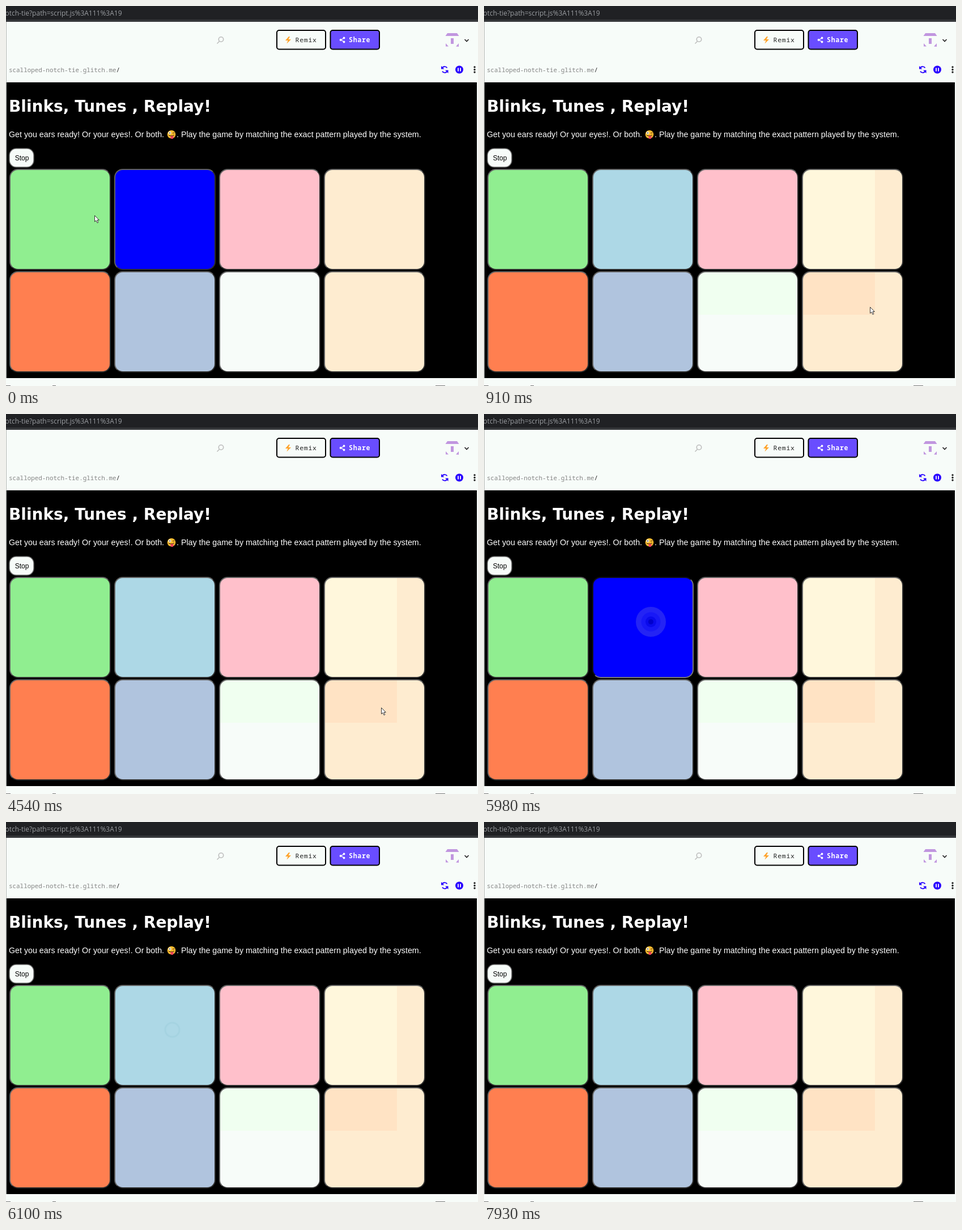
Recreate the animation shown at these times as an HTML page. Size 833x672 px, loop 8 s.

```html
<!DOCTYPE html>
<html lang="en">
<head>
<meta charset="utf-8">
<style>
html, body { margin: 0; width: 100%; height: 100%; overflow: hidden; background: #f7fcf9; }
svg { position: absolute; left: 0; top: 0; }
.tile {
  position: absolute; box-sizing: border-box; width: 179px; height: 179px;
  border: 2px solid; border-color: #626262 #2e2e2e #2e2e2e #626262;
  border-radius: 15px; background-repeat: no-repeat;
}
.tile.pressed { border-color: #101018 #77777a #77777a #101018; }
.sans { font-family: "Liberation Sans", Arial, sans-serif; }
.mono { font-family: "Noto Sans Mono", monospace; }
</style>
</head>
<body>
<svg width="833" height="672">
  <rect width="833" height="25" fill="#202124"/>
  <rect y="24" width="833" height="4" fill="#35373a"/>
  <text x="204.5" y="16.5" text-anchor="end" font-family="Open Sans, sans-serif" font-size="12" fill="#9a9da1">otch-tie?path=script.js%3A111%3A19</text>

  <g fill="none" stroke="#bdbdbd" stroke-width="1.6">
    <circle cx="379.5" cy="59" r="4.2"/><path d="M376.5 62.5L372.5 66.5"/>
  </g>
  <g stroke="#000" stroke-width="2">
    <rect x="478" y="43" width="86" height="33.5" rx="4" fill="#f7fcf9"/>
    <rect x="572.5" y="43" width="86.5" height="33.5" rx="4" fill="#694dff"/>
  </g>
  <path d="M499 54L493 61H497.5L495.5 66.5L503 59H498.500L501 54Z" fill="#ffa32b"/>
  <g class="mono" font-size="11.5" letter-spacing=".75">
    <text x="510.500" y="63.500" fill="#222">Remix</text>
    <text x="605" y="63.500" fill="#fff" font-weight="600">Share</text>
  </g>
  <path d="M597 56.500L591 60L597 63.500" fill="none" stroke="#fff" stroke-width="1.300"/>
  <g fill="#fff"><circle cx="596.500" cy="56.500" r="1.900"/><circle cx="590.500" cy="60" r="1.900"/><circle cx="596.500" cy="63.500" r="1.900"/></g>
  <path d="M779 48H796L799.500 53H775.500ZM785 57H790V67H785ZM776 66L781 71.500H776V72ZM799 66V72L794 71.500Z" fill="#c196df"/>
  <path d="M809.500 59L813 62.500L816.500 59" fill="none" stroke="#222" stroke-width="1.600"/>

  <text class="mono" x="5" y="116.500" font-size="10.900" fill="#858585">scalloped-notch-tie.glitch.me<tspan fill="#222">/</tspan></text>
  <g fill="none" stroke="#2800ff" stroke-width="1.900">
    <path d="M769 111A5.300 5.300 0 0 1 778.500 109.500M779.500 114A5.300 5.300 0 0 1 770 115.500"/>
  </g>
  <path d="M768 106V111.500H773.500ZM780.500 119V113.500H775Z" fill="#2800ff"/>
  <circle cx="800" cy="112.500" r="7" fill="#2800ff"/>
  <path d="M798 109.500V115.500M802 109.500V115.500" stroke="#fff" stroke-width="1.800"/>
  <g fill="#222"><circle cx="827" cy="108" r="1.700"/><circle cx="827" cy="112.500" r="1.700"/><circle cx="827" cy="117" r="1.700"/></g>

  <rect x="1" y="135" width="830" height="523" fill="#000"/>
  <path d="M.5 28V658" stroke="#b5b8b6"/>
  <path d="M0 671.500H8M82 671.500H88M758 671.500H775" stroke="#777"/>
  <text x="5" y="187" font-family="DejaVu Sans, sans-serif" font-weight="700" font-size="28" fill="#fff">Blinks, Tunes , Replay!</text>
  <g class="sans" font-size="14.250" fill="#fff">
    <text x="5" y="231.500">Get you ears ready! Or your eyes!. Or both.</text>
    <text x="301" y="231.500">. Play the game by matching the exact pattern played by the system.</text>
  </g>
  <circle cx="292" cy="227" r="7.300" fill="#fdbd2e"/>
  <circle cx="289" cy="224.500" r="2.400" fill="#fff"/><circle cx="289" cy="224.500" r="1.100" fill="#432"/>
  <path d="M294 225L297.500 224M287 228.500Q292 231 297 228" fill="none" stroke="#5b3516" stroke-width="1.300"/>
  <path d="M290.500 230H295.500V232.500A2.500 2.500 0 0 1 290.500 232.500Z" fill="#f0455c"/>

  <rect x="6" y="252" width="43" height="33" rx="12" fill="#f7fcf9" stroke="#666" stroke-width="1.500"/>
  <text class="sans" x="28" y="273" text-anchor="middle" font-size="12" fill="#000">Stop</text>
</svg>
<div id="tiles"></div>
<svg width="833" height="672">
  <circle id="ring" cx="293.500" cy="367.500" r="12.500" fill="none" stroke="#a5d3e1" stroke-width="3"/>
  <g id="ripple">
    <circle cx="294.500" cy="367.500" r="26.500" fill="#2424f4"/>
    <circle cx="294.500" cy="367.500" r="17" fill="#1818f6"/>
    <circle cx="294.500" cy="367.500" r="9.500" fill="#0a0aec"/>
    <circle cx="294.500" cy="367.500" r="4.500" fill="#0000cc"/>
  </g>
  <path id="cursor" d="M.5 .5V11.500L3 9.200L5 13.500L6.800 12.700L5 8.500H8.300Z" fill="#fff" stroke="#222" stroke-width=".9"/>
</svg>
<script>
const LOOP = 8000;
const $ = id => document.getElementById(id);
const colors = ['#90ee90', '#add8e6', '#ffc0cb', '#feecd0', '#ff7f50', '#b0c4de', '#f7fcf9', '#feecd0'];
// Tinted areas left by the first redraw: tile, colour, size
const tints = [[3, '#fff7dc', '127px 175px'], [6, '#f0fff0', '175px 75px'], [7, '#ffe3c4', '127px 75px']];
// Pointer stops: time, x, y (no place = hidden)
const stops = [
  [0, 156, 370], [120], [370, 616, 531], [490, 669, 518], [640, 675, 509], [790, 680, 520],
  [910, 681, 532], [4540, 662, 519], [4660, 622, 484], [5860]
];

const tiles = colors.map((color, i) => {
  const tile = document.createElement('div');
  tile.className = 'tile';
  tile.style.left = 6 + i % 4 * 185 + 'px';
  tile.style.top = 288 + (i >> 2) * 181 + 'px';
  tile.style.backgroundColor = color;
  $('tiles').append(tile);
  return tile;
});

const show = (id, on) => $(id).style.display = on ? '' : 'none';

function draw(now) {
  const t = now % LOOP;
  const within = (a, b) => t >= a && t < b;
  const pressed = within(5980, 6100);
  const lit = t < 910 || pressed || within(7030, 7930);

  tiles[1].style.backgroundColor = lit ? '#0000ff' : colors[1];
  tiles[1].classList.toggle('pressed', pressed);
  for (const [i, color, size] of tints) {
    tiles[i].style.backgroundImage = t < 910 ? 'none' : `linear-gradient(${color}, ${color})`;
    tiles[i].style.backgroundSize = size;
  }

  show('ripple', pressed);
  show('ring', within(5860, 7030) && !pressed);
  const [, x, y] = stops.findLast(s => s[0] <= t);
  show('cursor', x !== undefined);
  if (x !== undefined) $('cursor').setAttribute('transform', `translate(${x} ${y})`);
}

const start = performance.now();
function tick() {
  draw(performance.now() - start);
  requestAnimationFrame(tick);
}
tick();
</script>
</body>
</html>
```
